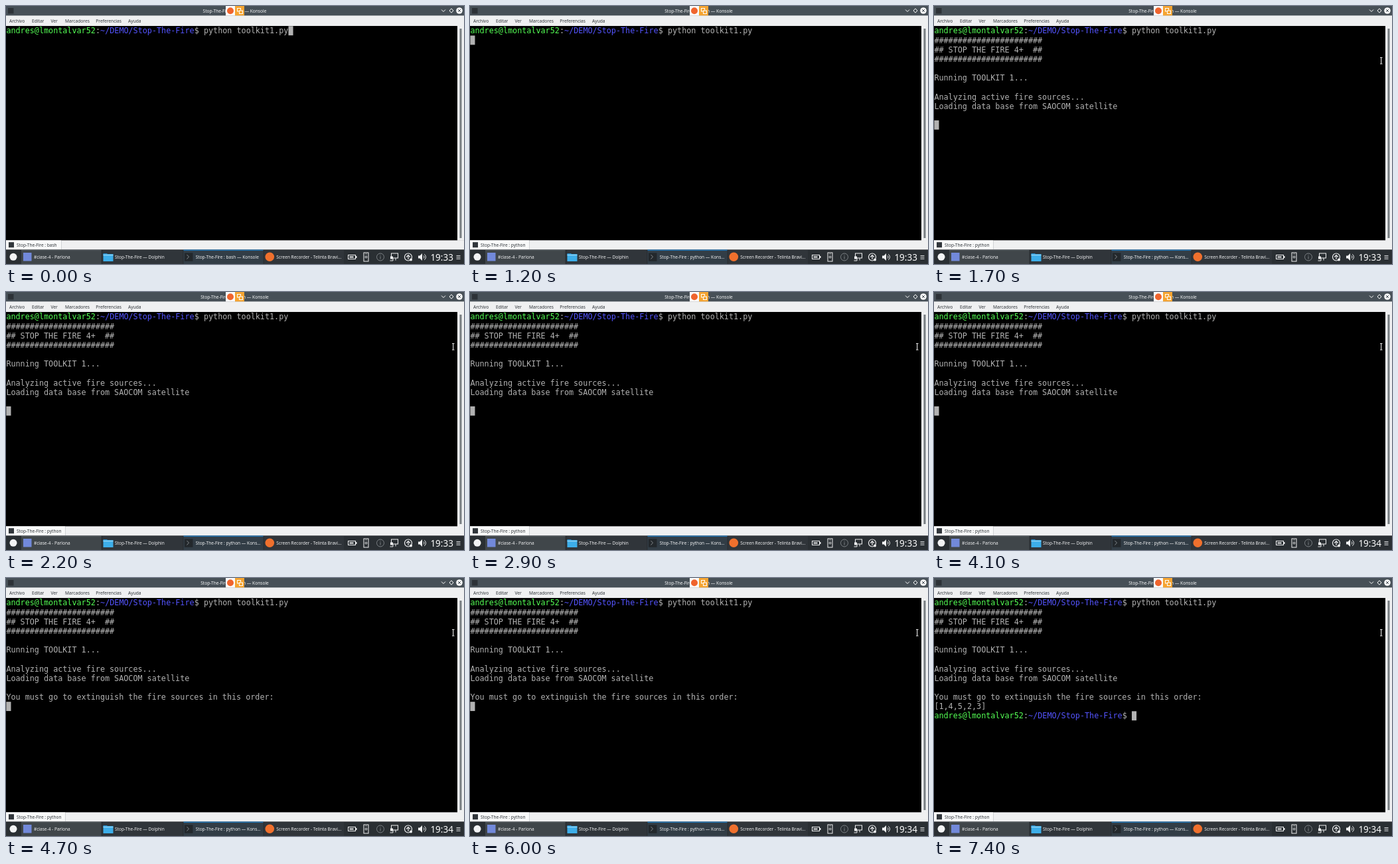
An HTML page with a canvas that plays this animation: 690 by 388 pixels, repeating every 7.5 s.

```html
<!DOCTYPE html>
<html lang="es">
<head>
<meta charset="utf-8">
<title>Terminal</title>
<style>
html, body { margin: 0; width: 100%; height: 100%; overflow: hidden; background: #000; }
canvas { display: block; width: 690px; height: 388px; }
</style>
</head>
<body>
<canvas id="stage" width="690" height="388"></canvas>
<script>
const ctx = document.getElementById("stage").getContext("2d");
const LOOP = 7500;
const ENTER = 500, TITLE = 1000, BANNER = 1300, POINTER = 1700;
const MINUTE = 3000, ORDER = 4300, DONE = 7300;

const SANS = '"Noto Sans", sans-serif';
const MONO = '"DejaVu Sans Mono", monospace';
const CELL = 7.085, ROW = 14.17, TOP = 30.3;
const GREY = "#b2b2b2", GREEN = "#54ff54", BLUE = "#5454ff";
const LIGHT = "#eff0f1", DARK = "#31363b";

const USER = "andres@lmontalvar52";
const FOLDER = "Stop-The-Fire";
const PATH = "~/DEMO/" + FOLDER;
const COMMAND = "python toolkit1.py";
const HASHES = "#".repeat(23);
const INTRO = [
  HASHES, "## STOP THE FIRE 4+  ##", HASHES, "",
  "Running TOOLKIT 1...", "",
  "Analyzing active fire sources...",
  "Loading data base from SAOCOM satellite", ""
];

function rect(x, y, w, h, color) {
  ctx.fillStyle = color;
  ctx.fillRect(x, y, w, h);
}

function disc(x, y, r, color) {
  ctx.fillStyle = color;
  ctx.beginPath();
  ctx.arc(x, y, r, 0, 7);
  ctx.fill();
}

function ring(x, y, r, color, width = 1) {
  ctx.strokeStyle = color;
  ctx.lineWidth = width;
  ctx.beginPath();
  ctx.arc(x, y, r, 0, 7);
  ctx.stroke();
}

function frame(x, y, w, h, color, width = 1) {
  ctx.strokeStyle = color;
  ctx.lineWidth = width;
  ctx.strokeRect(x, y, w, h);
}

function line(points, color, width = 1, close = false) {
  ctx.strokeStyle = color;
  ctx.lineWidth = width;
  ctx.beginPath();
  points.forEach(([x, y]) => ctx.lineTo(x, y));
  if (close) ctx.closePath();
  ctx.stroke();
}

function label(text, x, y, color, size = 6.55, align = "left") {
  ctx.font = `${size}px ${SANS}`;
  ctx.textAlign = align;
  ctx.fillStyle = color;
  ctx.fillText(text, x, y);
}

function cells(text, col, row, color) {
  ctx.font = `${CELL / 0.602}px ${MONO}`;
  ctx.textAlign = "left";
  ctx.fillStyle = color;
  ctx.fillText(text, 0.4 + col * CELL, TOP + row * ROW + 11.1);
}

function cursor(col, row) {
  rect(0.4 + col * CELL, TOP + row * ROW, CELL, ROW - 0.3, GREY);
}

// Returns the first free column after the prompt.
function prompt(row) {
  let col = 0;
  for (const [text, color] of [[USER, GREEN], [":", GREY], [PATH, BLUE], ["$ ", GREY]]) {
    cells(text, col, row, color);
    col += text.length;
  }
  return col;
}

function drawTitleBar(title) {
  rect(0, 0, 690, 14.5, "#475057");
  rect(3, 3, 8.5, 8.5, "#2d3237");
  label(title, 344.5, 9.5, "#f4f5f6", 6.6, "center");

  rect(331, 0, 14, 14.5, "#fafafa");
  disc(338, 7.3, 5, "#f0642d");
  rect(345, 0, 14, 14.5, "#f5a431");
  frame(348.5, 3.5, 5, 4.5, "#fff");
  rect(351, 6.5, 5.5, 5, "#f5a431");
  frame(351.5, 7, 5, 4.5, "#fff");

  line([[656, 5.5], [659, 8.5], [662, 5.5]], "#fcfcfc");
  line([[671, 3.8], [674, 7], [671, 10.2], [668, 7]], "#fcfcfc", 1, true);
  disc(683, 7, 4.8, "#fcfcfc");
  line([[681, 5], [685, 9]], "#475057");
  line([[685, 5], [681, 9]], "#475057");
}

function drawMenu() {
  rect(0, 14.5, 690, 15.5, LIGHT);
  const items = { Archivo: 5, Editar: 39, Ver: 67.5, Marcadores: 89, Preferencias: 135.3, Ayuda: 184 };
  for (const name in items) label(name, items[name], 24.7, DARK, 6.65);
}

function drawTerminal(t) {
  rect(0, 30, 680, 322.5, "#000");
  rect(680, 30, 10, 322.5, LIGHT);
  rect(683.5, 34, 3, 315, "#777d81");

  const start = prompt(0);
  cells(COMMAND, start, 0, GREY);
  if (t < ENTER) return cursor(start + COMMAND.length, 0);
  if (t < BANNER) return cursor(0, 1);

  INTRO.forEach((text, i) => cells(text, 0, i + 1, GREY));
  if (t < ORDER) return cursor(0, 10);

  cells("You must go to extinguish the fire sources in this order:", 0, 10, GREY);
  if (t < DONE) return cursor(0, 11);

  cells("[1,4,5,2,3]", 0, 11, GREY);
  cursor(prompt(12), 12);
}

function drawPointer() {
  line([[672, 77.5], [675.5, 77.5]], "#ddd");
  line([[673.7, 78], [673.7, 87]], "#ddd", 1.2);
  line([[672, 87], [675.5, 87]], "#ddd");
}

function drawTab(title, width) {
  rect(0, 352.5, 690, 14, LIGHT);
  rect(0, 352.5, width, 13.5, "#f8f9f9");
  rect(width, 353, 0.7, 13, "#c4c8ca");
  rect(4, 355.2, 8, 8, DARK);
  label(title, 16, 362.3, DARK);
}

function drawTray(clock) {
  const ink = "#f0f1f2", dim = "#7b8084";
  frame(515.5, 374.5, 11, 6, ink);
  rect(527, 376, 1.5, 3, ink);
  rect(517.5, 376.5, 6, 2, ink);

  frame(539, 371, 7, 13, ink);
  ring(542.5, 377.5, 1.4, ink);
  rect(541.5, 372.5, 2, 0.8, ink);

  ring(564, 377.5, 5.5, dim);
  rect(563.5, 374.3, 1, 1, dim);
  rect(563.5, 376.4, 1, 4.2, dim);

  frame(580.5, 372, 10, 7, ink);
  line([[583, 379], [583, 383], [578.5, 383]], ink);
  line([[587, 379], [587, 382.5]], ink);
  rect(579, 376.5, 4, 4, ink);

  ring(606, 377.5, 5.5, ink, 1.2);
  line([[603.3, 377.5], [606, 374.7], [608.7, 377.5]], ink, 1.2);
  line([[606, 375], [606, 381]], ink, 1.2);
  disc(610, 381.5, 2, ink);

  ctx.fillStyle = ink;
  ctx.beginPath();
  [[621, 375.5], [623.5, 375.5], [627, 372], [627, 383], [623.5, 379.5], [621, 379.5]]
    .forEach(([x, y]) => ctx.lineTo(x, y));
  ctx.fill();
  ctx.strokeStyle = ink;
  ctx.lineWidth = 1;
  for (const r of [2.5, 5]) {
    ctx.beginPath();
    ctx.arc(627.5, 377.5, r, -1, 1);
    ctx.stroke();
  }

  label(clock, 639.4, 382.6, "#fcfcfc", 13.5);
  for (let i = 0; i < 3; i++) rect(678.5, 375 + i * 2.4, 6, 0.9, ink);
}

function drawTaskbar(task, clock) {
  rect(0, 366.5, 690, 21.5, "#2a2f33");
  disc(11, 377.3, 5.5, "#f2f3f4");

  rect(23, 367, 120.5, 21, "#40464a");
  rect(23, 366.5, 120.5, 1, "#666c70");
  rect(26, 371, 12.5, 12.5, "#7289da");
  label("#clase-4 - Parlona", 42, 380, LIGHT);

  rect(146, 367, 120, 21, "#30353a");
  rect(146.5, 372, 6, 3, "#2b83bd");
  rect(146.5, 373, 15, 11, "#3daee9");
  rect(146.5, 374.2, 15, 1, "#a8dcf5");
  label(FOLDER + " — Dolphin", 164, 380, LIGHT);

  rect(267.5, 367, 120, 21, "#323d46");
  rect(267.5, 366.5, 120, 1.5, "#2878b4");
  rect(269, 371.3, 12.5, 12.5, "#23282c");
  line([[272.5, 374], [275.5, 377.2], [272.5, 380.5]], "#858a8e");
  label(task, 285.7, 380, LIGHT);

  rect(389, 367, 120, 21, "#30353a");
  disc(397.3, 377.3, 6.8, "#f0702d");
  label("Screen Recorder - Telinta Bravi...", 407.3, 380, LIGHT, 6.5);

  drawTray(clock);
}

function draw(t) {
  const running = t >= TITLE;
  const session = `${FOLDER} : ${running ? "python" : "bash"}`;
  drawTitleBar(session + " — Konsole");
  drawMenu();
  drawTerminal(t);
  if (t >= POINTER) drawPointer();
  drawTab(session, running ? 89 : 83);
  drawTaskbar(session + (running ? " — Kons..." : " — Konsole"), t < MINUTE ? "19:33" : "19:34");
}

const begin = performance.now();
function tick() {
  draw((performance.now() - begin) % LOOP);
  requestAnimationFrame(tick);
}
tick();
</script>
</body>
</html>
```
